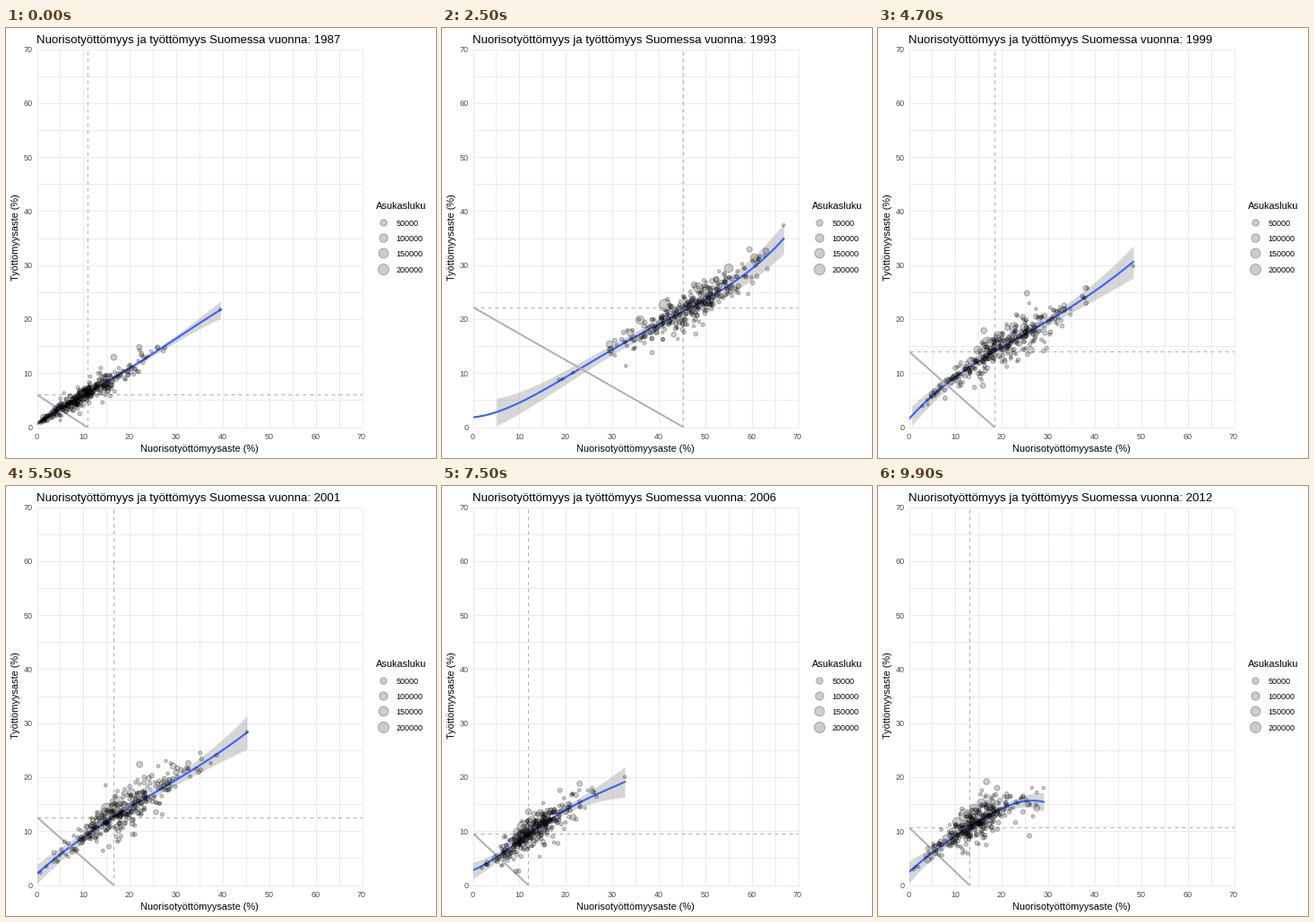
Animation of 480x480 px, one loop 10 s. Source, as a matplotlib script:

```python
import numpy as np
import matplotlib.pyplot as plt
from matplotlib.animation import FuncAnimation

W = H = 480
FRAMES, INTERVAL = 100, 100
FIRST, LAST = 1987, 2012
PLACES = 330
GREY = "#b0b0b0"

plt.rcParams["font.family"] = "Liberation Sans"
rng = np.random.default_rng(7)

# National means per year: youth unemployment (x) and unemployment (y)
YEAR_FRAMES = np.round(np.linspace(0, FRAMES - 1, LAST - FIRST + 1))
MEAN_X = [10.8, 9.5, 7.2, 7.7, 24.1, 38.5, 46.3, 42.3, 36.5, 30.5, 24, 20.5, 17.7,
          16.6, 16.5, 16.3, 15.6, 15.2, 14, 11.9, 10.4, 11.6, 16.9, 13.6, 12.2, 13]
MEAN_Y = [6.0, 5.2, 4.0, 4.2, 11.8, 18.4, 22.5, 21.3, 20, 18.9, 16.6, 14.8, 13.75,
          12.8, 12.6, 12.4, 12, 11.6, 10.9, 9.6, 8.6, 8.9, 12.5, 10.8, 10, 10.7]

# Trend and cloud: frame | x end, cloud centre, cloud spread |
# trend at 5 even steps, band at start and end, scatter | skew
KEYS = np.array([
    [0, 39.5, 11.8, 6.4, 0.6, 5.8, 10.8, 16.2, 21.7, 0.3, 1.6, 1.15, 0.25],
    [13, 37.9, 14.0, 5.6, 1.0, 5.0, 9.6, 13.5, 15.0, 0.4, 2.2, 1.0, 0.10],
    [25, 66.9, 47.5, 8.0, 1.8, 7.6, 16.0, 23.7, 34.9, 3.2, 2.8, 2.0, -0.15],
    [47, 48.3, 21.5, 8.2, 1.5, 10.5, 16.8, 23.0, 30.6, 1.9, 3.0, 2.1, 0.10],
    [64, 44.5, 18.3, 6.6, 2.7, 9.3, 15.5, 21.3, 27.5, 1.8, 3.3, 2.0, 0.15],
    [86, 40.9, 18.0, 5.8, 4.0, 7.9, 13.8, 17.8, 19.4, 1.9, 3.7, 2.0, 0.10],
    [99, 29.0, 15.3, 5.0, 2.4, 7.4, 11.6, 14.8, 15.4, 2.0, 1.7, 1.9, 0.10],
])

# Large towns: population, x relative to the mean, lift above the trend
TOWNS = np.array([[265e3, .93, .22], [150e3, 1.06, .22], [110e3, 1.22, .24],
                  [100e3, .82, .20], [60e3, .72, .10], [90e3, 1.3, .12]])


def means(frame):
    return (np.interp(frame, YEAR_FRAMES, MEAN_X),
            np.interp(frame, YEAR_FRAMES, MEAN_Y))


def relative_keys():
    rel = KEYS.copy()
    for row in rel:
        mx, my = means(row[0])
        row[1:4] /= mx
        row[4:12] /= my
    return rel


REL = relative_keys()


def state(frame):
    mx, my = means(frame)
    row = np.array([np.interp(frame, REL[:, 0], col) for col in REL.T[1:]])
    row[:3] *= mx
    row[3:11] *= my
    return mx, my, row


def yearly(base, keep, noise):
    """A lasting trait per place plus fresh noise for each year."""
    return keep * base + np.sqrt(1 - keep ** 2) * noise


years = len(YEAR_FRAMES)
base_x = rng.normal(size=PLACES)
base_x[1:10] -= 1.8
DRIFT_X = yearly(base_x, .8, rng.normal(size=(years, PLACES)))
DRIFT_Y = yearly(rng.laplace(scale=.75, size=PLACES), .75,
                 rng.laplace(scale=.75, size=(years, PLACES)))
population = np.clip(rng.lognormal(8.35, 1.0, PLACES), 300, 50e3)
population[:10] = 900
population[-len(TOWNS):] = TOWNS[:, 0]


def at_frame(table, frame):
    k = min(np.searchsorted(YEAR_FRAMES, frame, "right") - 1, years - 2)
    a, b = YEAR_FRAMES[k:k + 2]
    t = (frame - a) / (b - a)
    return (1 - t) * table[k] + t * table[k + 1]


def area(pop):
    size = 1 + 5 * np.sqrt(np.asarray(pop) / 270e3)
    return (0.75 * (size * 2.845 + 0.9)) ** 2


def cloud(frame, mx, my, row, trend):
    end, centre, spread = row[:3]
    noise, skew = row[10:]
    z = at_frame(DRIFT_X, frame)
    x = centre + spread * (z + skew * (z ** 2 - 1) / 2)
    soft = .12 * mx
    x = soft * np.logaddexp(0, x / soft)
    x = np.minimum(x, end * (.93 + .02 * np.tanh(z)))
    x[0] = end
    towns = slice(-len(TOWNS), None)
    x[towns] = mx * (TOWNS[:, 1] + .02 * z[towns])
    lift = noise * np.minimum(1, .15 + .85 * x / centre) * at_frame(DRIFT_Y, frame)
    lift[towns] = my * TOWNS[:, 2] * np.interp(frame, [0, 25, 99], [.1, .6, 1.15])
    return x, np.abs(trend(x / end) + lift)


fig = plt.figure(figsize=(W / 72, H / 72), dpi=72, facecolor="white")
ax = fig.add_axes([34.5 / W, 34.5 / H, 363 / W, 422 / H])
ax.set(xlim=(0, 70), ylim=(0, 70))
ax.axis("off")


def label(x, y, text, size, **kw):
    return fig.text(x / W, 1 - y / H, text, fontsize=size, **kw)


for v in range(0, 71, 5):
    for line in (ax.axhline, ax.axvline):
        line(v, color="#ebebeb", lw=1, clip_on=False, zorder=0, snap=True)
for v in range(0, 71, 10):
    label(34 + v * 363 / 70, 459, str(v), 9, color="#4d4d4d", ha="center")
    label(29.5, 449 - v * 422 / 70, str(v), 9, color="#4d4d4d", ha="right")

title = label(34, 17, "", 13.2)
label(216, 473, "Nuorisotyöttömyysaste (%)", 11, ha="center")
label(16, 234, "Työttömyysaste (%)", 11, rotation=90, ha="right", va="center")

DOT = dict(facecolor=(0, 0, 0, .2), edgecolor=(0, 0, 0, .28), linewidth=1)
legend = fig.add_axes([0, 0, 1, 1])
legend.set(xlim=(0, W), ylim=(H, 0))
legend.axis("off")
label(413, 202, "Asukasluku", 11)
for i, pop in enumerate((50000, 100000, 150000, 200000)):
    y = 217 + 17.2 * i
    legend.scatter([421.3], [y], s=area(pop), **DOT)
    label(435.5, y + 4, str(pop), 9)

S = np.linspace(0, 1, 80)
STEPS = np.linspace(0, 1, 5)
band = ax.fill_between([0, 1], 0, 0, color="#999999", alpha=.4, lw=0, zorder=1)
curve, = ax.plot([], [], color="#3366ff", lw=2.1, zorder=2)
diagonal, = ax.plot([], [], color=GREY, lw=2, zorder=3)
DASH = dict(color=GREY, lw=1, linestyle=(0, (4, 4)), zorder=3, snap=True)
vline = ax.axvline(0, **DASH)
hline = ax.axhline(0, **DASH)
dots = ax.scatter(np.zeros(PLACES), np.zeros(PLACES), s=area(population), zorder=4, **DOT)


def draw(frame):
    mx, my, row = state(frame)
    end = row[0]
    trend = np.poly1d(np.polyfit(STEPS, row[3:8], 4))
    x, y = end * S, trend(S)

    mid = .03 * my
    half = mid + (row[8] - mid) * (1 - S) ** 4 + (row[9] - mid) * S ** 4
    ok = y - half >= 0
    outline = np.r_[np.c_[x, y - half][ok], np.c_[x, y + half][ok][::-1]]
    band.set_verts([outline])
    curve.set_data(x, y)

    diagonal.set_data([0, mx], [my, 0])
    vline.set_xdata([mx, mx])
    hline.set_ydata([my, my])
    dots.set_offsets(np.c_[cloud(frame, mx, my, row, trend)])
    year = round(FIRST + (LAST - FIRST) * frame / (FRAMES - 1))
    title.set_text(f"Nuorisotyöttömyys ja työttömyys Suomessa vuonna: {year}")
    return band, curve, diagonal, vline, hline, dots, title


anim = FuncAnimation(fig, draw, frames=FRAMES, interval=INTERVAL, repeat=True)
plt.show()
```
